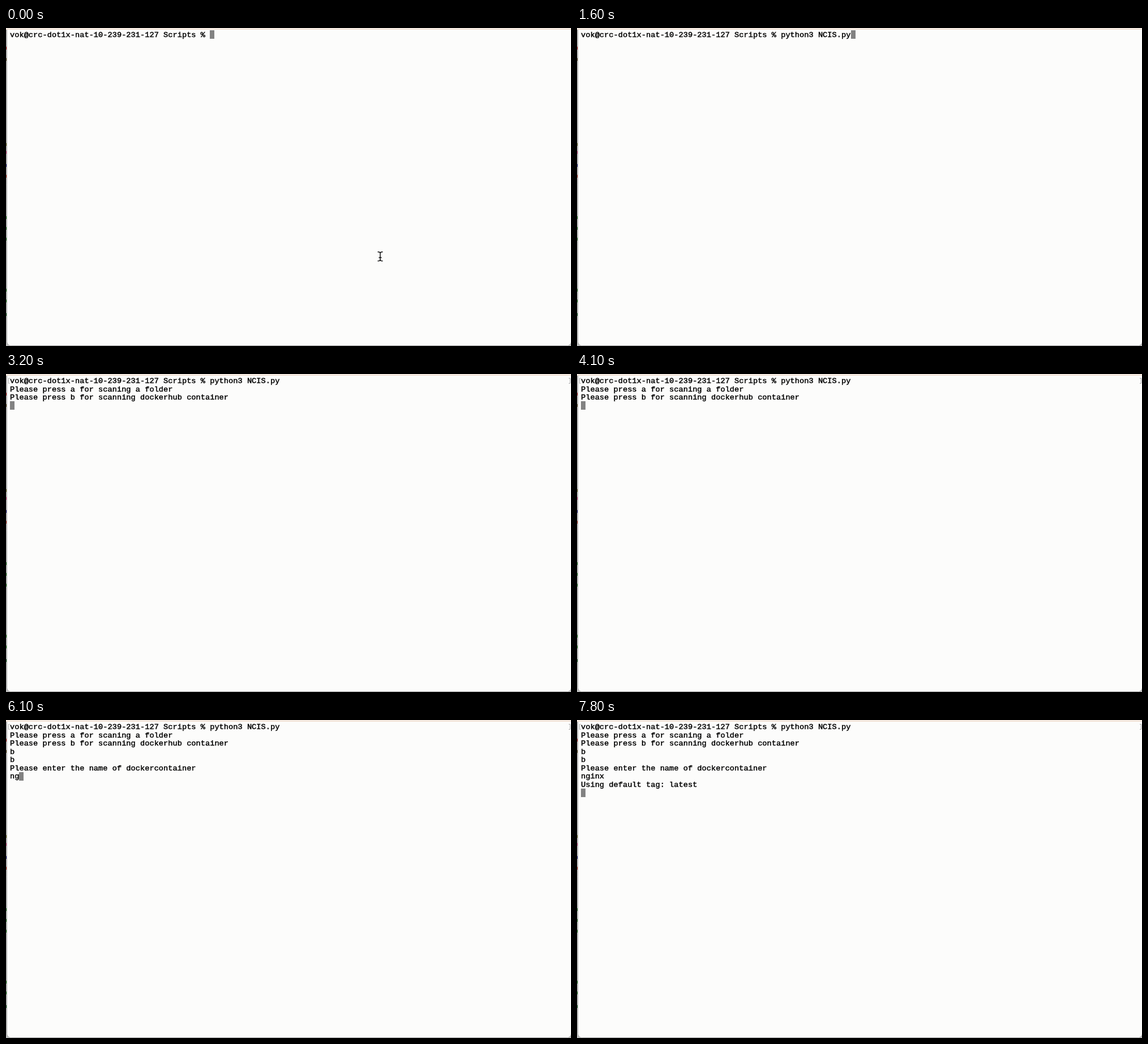
Write an HTML page with a canvas that moves like this. It is 998x561 px and loops after 8000 ms.

```html
<!DOCTYPE html>
<html lang="en">
<head>
<meta charset="utf-8">
<title>Terminal session</title>
<style>
  html, body { margin: 0; width: 100%; height: 100%; overflow: hidden; background: #fcfcfb; }
  canvas { display: block; width: 998px; height: 561px; }
</style>
</head>
<body>
<canvas id="stage" width="998" height="561"></canvas>
<script>
const ctx = document.getElementById('stage').getContext('2d');
const W = 998, H = 561, LOOP = 8000;
const LEFT = 7, COL = 8.22, ROW = 14.56;

const prompt = 'vok@crc-dot1x-nat-10-239-231-127 Scripts % ';
const command = 'python3 NCIS.py';

// Text appended to the terminal at each moment (ms).
const script = [
  [0, prompt],
  [800, command],
  [2700, '\n'],
  [3100, 'Please press a for scaning a folder\n' +
         'Please press b for scanning dockerhub container\n'],
  [4500, 'b'],
  [4900, '\nb\nPlease enter the name of dockercontainer\n'],
  [5800, 'n'], [6100, 'g'], [6300, 'i'], [6500, 'n'], [6900, 'x'],
  [7400, '\n'],
  [7600, 'Using default tag: latest\n'],
];
const POINTER_HIDDEN = 800, ENTERED = 2700;

// Slivers of the window behind, visible along the left edge.
const slivers = [
  ['#b02020', 36], ['#5a4a20', 56], ['#6a6a20', 206], ['#d04080', 220],
  ['#202080', 243], ['#b03020', 262], ['#208020', 335], ['#208020', 354],
  ['#208020', 373], ['#208020', 463], ['#208020', 482], ['#106020', 506],
];

function rect(color, x, y, w, h) {
  ctx.fillStyle = color;
  ctx.fillRect(x, y, w, h);
}

function path(color, width, points) {
  ctx.strokeStyle = color;
  ctx.lineWidth = width;
  ctx.beginPath();
  points.forEach(([x, y]) => ctx.lineTo(x, y));
  ctx.stroke();
}

function drawWindow() {
  rect('#bdbdbd', 0, 0, W, H);
  ctx.fillStyle = '#fcfcfb';
  ctx.strokeStyle = '#9c9c9c';
  ctx.lineWidth = 1;
  ctx.beginPath();
  ctx.roundRect(1.5, -12, W - 1, H + 11.5, 7);
  ctx.fill();
  ctx.stroke();
  rect('#f8f4f0', 0, 0, W, 1);
  rect('#f2e2d5', 0, 1, W, 2);
  slivers.forEach(([color, y]) => rect(color, 0, y - 3, 1, 5));
}

function drawBrackets() {
  path('#a8a8a8', 1, [[6.5, 7.5], [4.5, 7.5], [4.5, 16.5], [6.5, 16.5]]);
  path('#a8a8a8', 1, [[994, 7.5], [996.5, 7.5], [996.5, 16.5], [994, 16.5]]);
}

function drawPointer(x, y) {
  ctx.lineCap = 'round';
  for (const [color, width] of [['#ffffff', 3.5], ['#111111', 1.5]]) {
    ctx.strokeStyle = color;
    ctx.lineWidth = width;
    ctx.beginPath();
    for (const side of [-1, 1]) {
      ctx.moveTo(x - 4, y + side * 8);
      ctx.quadraticCurveTo(x, y + side * 8, x, y + side * 5.5);
      ctx.quadraticCurveTo(x, y + side * 8, x + 4, y + side * 8);
    }
    ctx.moveTo(x, y - 6);
    ctx.lineTo(x, y + 6);
    ctx.moveTo(x - 2, y + 2);
    ctx.lineTo(x + 2, y + 2);
    ctx.stroke();
  }
  ctx.lineCap = 'butt';
}

function drawTerminal(t) {
  const lines = script.filter(([at]) => at <= t).map(([, s]) => s).join('').split('\n');
  const row = lines.length - 1;
  const x = Math.round(LEFT + lines[row].length * COL);
  rect('#828282', x, Math.round(4.3 + row * ROW), 8, 15);
  ctx.fillStyle = ctx.strokeStyle = '#000';
  ctx.lineWidth = 0.45;
  ctx.font = '13.7px "Liberation Mono", "DejaVu Sans Mono", monospace';
  lines.forEach((line, i) => {
    const y = Math.round(16 + i * ROW);
    ctx.fillText(line, LEFT, y);
    ctx.strokeText(line, LEFT, y);
  });
}

function frame(now) {
  const t = now % LOOP;
  drawWindow();
  if (t >= ENTERED) drawBrackets();
  drawTerminal(t);
  if (t < POINTER_HIDDEN) drawPointer(661, 403);
  requestAnimationFrame(frame);
}
requestAnimationFrame(frame);
</script>
</body>
</html>
```
